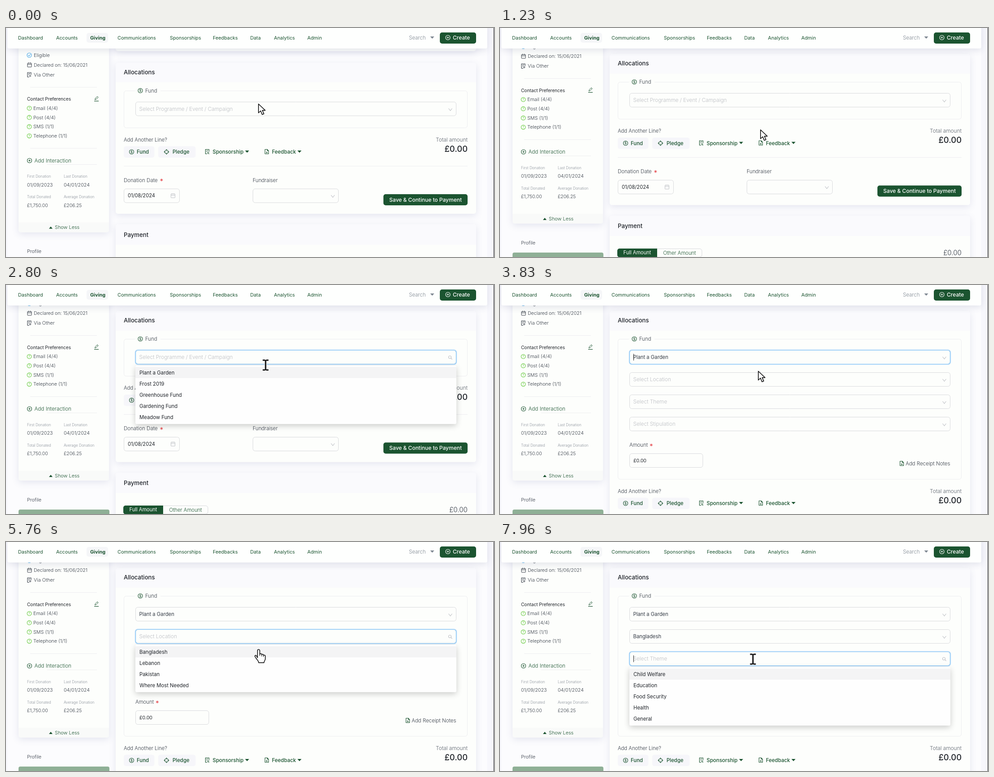
Recreate the animation shown at these times as an HTML page with a canvas. Size 1090x514 px, loop 8000 ms.

```html
<!DOCTYPE html>
<html lang="en">
<head>
<meta charset="utf-8">
<title>Donation form</title>
<style>
  html, body { margin: 0; width: 100%; height: 100%; overflow: hidden; background: #fcfcfe; }
  canvas { display: block; width: 1090px; height: 514px; }
</style>
</head>
<body>
<canvas id="stage" width="1090" height="514"></canvas>
<script>
const ctx = document.getElementById('stage').getContext('2d');
const LOOP = 8000, SCROLL = 19.5, EXPAND_AT = 3660, EXPAND = 231.5;
const GREEN = '#1b5430', INK = '#343b46', DARK = '#1f2329', MUTED = '#8b919b', RED = '#e5484d';
const BORDER = '#d9dadd', FAINT = '#ededf0', PALE = '#bfc1c6', CARD = '#fdfefc', HEAD = '#fafafd', BLUE = '#7fc1f3';

const fields = [
  { y: 162, hint: 'Select Programme / Event / Campaign', value: 'Plant a Garden',
    open: 2380, pick: 3650, close: 3650, blur: 4740,
    items: ['Plant a Garden', 'Frost 2019', 'Greenhouse Fund', 'Gardening Fund', 'Meadow Fund'],
    caret: [[2380, 2740], [3250, 4140]] },
  { y: 212, hint: 'Select Location', value: 'Bangladesh',
    open: 4740, pick: 6910, close: 6970, blur: 7720,
    items: ['Bangladesh', 'Lebanon', 'Pakistan', 'Where Most Needed'],
    caret: [[4740, 5300], [5800, 6300], [6860, 7360]] },
  { y: 262, hint: 'Select Theme', value: '',
    open: 7720, pick: Infinity, close: Infinity, blur: Infinity,
    items: ['Child Welfare', 'Education', 'Food Security', 'Health', 'General'],
    caret: [[7720, 8000]] },
  { y: 312, hint: 'Select Stipulation', value: '', open: Infinity, pick: Infinity, close: Infinity, blur: Infinity, items: [], caret: [] }
];

// start, end, x, y reached at the end
const moves = [
  [60, 630, 582, 228], [1500, 2230, 580, 179], [2730, 3260, 577, 193],
  [4100, 4500, 571, 214], [5260, 5830, 564, 242], [7130, 7530, 565, 263]
];

const clamp = v => Math.max(0, Math.min(1, v));
const span = (t, from, length) => t < from ? 0 : clamp((t - from) / length);
const smooth = u => u * u * (3 - 2 * u);

function text(str, x, y, size, color = INK, weight = 300, align = 'left') {
  ctx.font = `${weight} ${size}px Inter, sans-serif`;
  ctx.textAlign = align;
  ctx.fillStyle = color;
  ctx.fillText(str, x, y + size * 0.36);
}

function box(x, y, w, h, r, fill, stroke, width = 1) {
  ctx.beginPath();
  ctx.roundRect(x, y, w, h, r);
  if (fill) { ctx.fillStyle = fill; ctx.fill(); }
  if (stroke) { ctx.strokeStyle = stroke; ctx.lineWidth = width; ctx.stroke(); }
}

function shadowed(color, blur, dy, draw) {
  ctx.save();
  ctx.shadowColor = color;
  ctx.shadowBlur = blur;
  ctx.shadowOffsetY = dy;
  draw();
  ctx.restore();
}

function line(points, color, width = 1) {
  ctx.beginPath();
  for (let i = 0; i < points.length; i += 2) ctx.lineTo(points[i], points[i + 1]);
  ctx.strokeStyle = color;
  ctx.lineWidth = width;
  ctx.stroke();
}

function ring(x, y, r, color, width = 1) {
  ctx.beginPath();
  ctx.arc(x, y, r, 0, Math.PI * 2);
  ctx.strokeStyle = color;
  ctx.lineWidth = width;
  ctx.stroke();
}

function triangle(x, y, dir, color, w = 4.5) {
  ctx.beginPath();
  ctx.moveTo(x - w, y - 2.5 * dir);
  ctx.lineTo(x + w, y - 2.5 * dir);
  ctx.lineTo(x, y + 2.5 * dir);
  ctx.fillStyle = color;
  ctx.fill();
}

function badge(sign, x, y, color, r = 5) {
  ring(x, y, r, color, 1.1);
  text(sign, x, y, r * 1.55, color, 500, 'center');
}

function plusBadge(x, y, color) {
  ring(x, y, 5, color, 1.1);
  line([x - 2.5, y, x + 2.5, y], color);
  line([x, y - 2.5, x, y + 2.5], color);
}

function calendar(x, y, color) {
  box(x - 4.5, y - 4, 9, 8.5, 0.5, null, color);
  line([x - 4.5, y - 1, x + 4.5, y - 1], color);
  line([x - 2, y - 5.5, x - 2, y - 3], color);
  line([x + 2, y - 5.5, x + 2, y - 3], color);
}

function sheet(x, y, color, mark) {
  line([x + 4, y, x + 4, y - 5, x - 4, y - 5, x - 4, y + 5, x, y + 5], color, 1.1);
  line([x - 2, y - 2.5, x + 2, y - 2.5], color);
  line([x - 2, y, x, y], color);
  ring(x + 2, y + 2.5, 1.5, color);
  if (mark) line([x + 2, y + 4, x + 4.5, y + 5.5], color);
}

function note(x, y, color) {
  line([x + 1, y - 5, x - 4, y - 5, x - 4, y + 5, x + 4, y + 5, x + 4, y - 2, x + 1, y - 5, x + 1, y - 2, x + 4, y - 2], color, 1.1);
  line([x - 2, y + 2, x + 2, y + 2], color);
  line([x, y, x, y + 4], color);
}

function chevron(x, y) {
  line([x - 4, y - 2, x, y + 3, x + 4, y - 2], PALE, 1.1);
}

function magnifier(x, y) {
  ring(x - 1, y - 1, 3, PALE, 1.1);
  line([x + 1.2, y + 1.2, x + 4, y + 4], PALE, 1.2);
}

function card(x, y, w, h, headHeight) {
  shadowed('rgba(70,75,140,.13)', 16, 4, () => box(x, y, w, h, 5, CARD));
  if (headHeight) box(x, y, w, headHeight, [5, 5, 0, 0], HEAD);
}

function sidebar() {
  card(28, -60, 202, 499);
  box(28, 417, 202, 22, [0, 0, 5, 5], '#f9faf9');
  ring(52, 41.5, 5, '#45a5e6', 1.1);
  line([49.5, 41.5, 51.5, 43.5, 54.8, 39.5], '#45a5e6', 1.1);
  text('Eligible', 62, 41.5, 10.8);
  calendar(52.5, 63.5, INK);
  text('Declared on: 15/06/2021', 62, 63.5, 10.6);
  sheet(52, 85.5, INK);
  text('Via Other', 62, 85.5, 10.8);
  line([54, 113.5, 203, 113.5], FAINT);

  text('Contact Preferences', 47, 140, 10.1, DARK, 400);
  line([198.5, 141.5, 199.5, 138.5, 204, 134, 206, 136, 201.5, 140.5, 198.5, 141.5], GREEN);
  line([197, 144.5, 207, 144.5], GREEN, 1.2);
  ['Email (4/4)', 'Post (4/4)', 'SMS (1/1)', 'Telephone (1/1)'].forEach((label, i) => {
    const y = 160.5 + i * 20.7;
    badge('?', 52, y, '#6ccb45', 4.8);
    text(label, 61, y, 10.8);
  });
  line([54, 250.5, 203, 250.5], FAINT);

  plusBadge(52.5, 278, GREEN);
  text('Add Interaction', 63.5, 278, 11.7, GREEN);
  line([92, 287, 203, 287], FAINT);
  const stats = [['First Donation', '01/09/2023'], ['Last Donation', '04/01/2024'],
                 ['Total Donated', '£1,750.00'], ['Average Donation', '£206.25']];
  stats.forEach(([label, value], i) => {
    const x = i % 2 ? 129 : 47, y = i < 2 ? 314 : 360;
    text(label, x, y, 8.3, MUTED);
    text(value, x, y + 18.3, i < 2 ? 10.7 : 10.4);
  });
  triangle(100, 428.5, -1, GREEN, 4);
  text('Show Less', 109, 428, 10.9, GREEN);
  text('Profile', 47, 482, 10.9);
  box(28, 504, 203, 60, 4, '#8fb096');
}

function addLineRow() {
  text('Add Another Line?', 263, 231, 11.3);
  text('Total amount', 1031, 231, 11.8, '#5a616c', 300, 'right');
  text('£0.00', 1031, 251.8, 18.4, DARK, 500, 'right');
  box(263, 246, 68.5, 25.5, 5, '#f6f6fa');
  box(340, 246, 83.5, 25.5, 5, '#f6f6fa');
  badge('$', 280.5, 258.5, GREEN);
  text('Fund', 292, 258.5, 11.4, GREEN, 500);
  ring(358.5, 258.5, 4, GREEN, 1.2);
  for (const [dx, dy] of [[1, 0], [-1, 0], [0, 1], [0, -1]])
    line([358.5 + dx * 2.5, 258.5 + dy * 2.5, 358.5 + dx * 6, 258.5 + dy * 6], GREEN, 1.2);
  text('Pledge', 372, 258.5, 11.4, GREEN, 500);
  sheet(449.5, 258, GREEN, true);
  text('Sponsorship', 461.5, 258.5, 11.5, GREEN, 500);
  triangle(538.5, 258, 1, GREEN);
  note(582.5, 258, GREEN);
  text('Feedback', 594, 258.5, 11.5, GREEN, 500);
  triangle(655.5, 258, 1, GREEN);
  line([263, 290.5, 1031, 290.5], FAINT);
}

function donationRow() {
  text('Donation Date', 263, 322, 11.5);
  text('*', 343.5, 324.5, 15, RED, 500);
  text('Fundraiser', 551, 322, 11.3);
  box(263.5, 341.5, 124, 31, 5, CARD, BORDER);
  text('01/08/2024', 272, 357, 11.1, DARK, 400);
  calendar(373, 357, PALE);
  box(551.5, 341.5, 191, 31, 5, CARD, BORDER);
  chevron(730, 357.5);
  box(843, 353.5, 188, 25, 5, GREEN);
  text('Save & Continue to Payment', 937, 366, 12, '#fff', 500, 'center');
}

function payment() {
  card(245, 421, 805, 200, 46);
  text('Payment', 263, 444.5, 13.2, DARK, 500);
  box(262.5, 495.5, 188.5, 18.5, 5, CARD, BORDER);
  box(262, 495, 89, 19.5, [5, 0, 0, 5], GREEN);
  text('Full Amount', 306.5, 504.5, 11.1, '#fff', 400, 'center');
  text('Other Amount', 401, 504.5, 11.3, GREEN, 300, 'center');
  text('£0.00', 1031, 504.5, 15.2, INK, 300, 'right');
}

function select(f, t, hovered) {
  const focus = span(t, f.open, 120) - span(t, f.blur, 180);
  const top = f.y - 15.5;
  if (focus > 0) box(288.5, top - 1, 718, 33, 6, null, `rgba(30,145,255,${0.2 * focus})`, 2);
  box(289.5, top, 716, 31, 5, CARD, BORDER);
  if (hovered || focus > 0) {
    ctx.save();
    ctx.globalAlpha = hovered ? 1 : focus;
    box(289.5, top, 716, 31, 5, null, BLUE, 1.2);
    ctx.restore();
  }
  const picked = t >= f.pick;
  text(picked ? f.value : f.hint, 297.5, f.y, picked ? 11.3 : 11.8, picked ? INK : '#bcbec3', picked ? 400 : 300);
  if (f.caret.some(([from, to]) => t >= from && t < to)) line([298.5, f.y - 7.5, 298.5, f.y + 7.5], '#222', 1);
  if (t >= f.open && !picked) magnifier(992.5, f.y + 1);
  else chevron(992.5, f.y + 1);
}

function menuAmount(f, t) {
  return t < f.close ? 1 - (1 - span(t, f.open, 220)) ** 5 : 1 - span(t, f.close, 180) ** 1.5;
}

function menu(f, t) {
  const p = menuAmount(f, t);
  if (p <= 0) return;
  const picked = t >= f.pick, h = f.items.length * 25 + 6;
  ctx.save();
  ctx.globalAlpha = p;
  ctx.translate(0, f.y + 19);
  ctx.scale(1, 0.8 + 0.2 * p);

  // The shadow stays outside the panel, so a fading panel is not darkened by it.
  ctx.save();
  ctx.beginPath();
  ctx.rect(0, -100, 1090, h + 200);
  ctx.roundRect(289, 0, 717, h, 4);
  ctx.clip('evenodd');
  shadowed('rgba(0,0,0,.2)', 14, 4, () => box(289, 0, 717, h, 4, '#fefefe'));
  ctx.restore();

  box(289, 0, 717, h, 4, '#fefefe');
  box(289, 3, 717, 25, 0, picked ? '#e8f6fc' : '#f4f4f5');
  f.items.forEach((item, i) => {
    text(item, 298, 15.5 + i * 25, 11.3, DARK, picked && i === 0 ? 600 : 400);
  });
  ctx.restore();
}

function allocations(t, pointer) {
  const expanded = t >= EXPAND_AT, extra = expanded ? EXPAND : 0;
  card(245, 58.5, 805, 339 + extra, 44);
  text('Allocations', 263, 79.5, 13.1, DARK, 500);
  box(263.5, 121.5, 767, 83 + extra, 5, null, FAINT);
  box(288, 118, 57, 7, 0, CARD);
  badge('$', 300, 121, GREEN);
  text('Fund', 311, 121, 11.4);

  const shown = expanded ? fields : fields.slice(0, 1);
  shown.forEach(f => select(f, t, pointer.kind === 'text' && pointer.field === f));
  if (expanded) {
    text('Amount', 289, 359, 11.4);
    text('*', 334, 361.5, 15, RED, 500);
    box(289.5, 378.5, 163.5, 31, 5, CARD, BORDER);
    text('£0.00', 298, 394, 10.6, DARK, 400);
    note(897.5, 400.5, GREEN);
    text('Add Receipt Notes', 906, 400.5, 11.5, INK);
  }
  ctx.save();
  ctx.translate(0, extra);
  addLineRow();
  donationRow();
  payment();
  ctx.restore();
  shown.forEach(f => menu(f, t));
}

function navigation() {
  shadowed('rgba(60,65,110,.14)', 16, 4, () => box(3, -10, 1072, 56, 4, '#fefffe'));
  box(180, 11, 48, 22, 5, '#f5f6f8');
  const links = [['Dashboard', 27], ['Accounts', 112], ['Giving', 188], ['Communications', 249], ['Sponsorships', 366],
                 ['Feedbacks', 462], ['Data', 545.5], ['Analytics', 598.5], ['Admin', 673]];
  for (const [label, x] of links) text(label, x, 22, 10.8, GREEN, label === 'Giving' ? 700 : 400);
  text('Search', 900, 22, 11.5, '#7e8791');
  triangle(952, 21.5, 1, '#7e8791', 4.5);
  box(969, 10, 81, 25, 5, GREEN);
  plusBadge(987, 21.5, '#fff');
  text('Create', 998, 22, 12, '#fff', 500);
}

function tooltip() {
  box(573.5, 251.5, 58, 20, 1, '#fff', '#9a9a9a');
  ctx.font = '9px "Open Sans", sans-serif';
  ctx.textAlign = 'center';
  ctx.fillStyle = '#575757';
  ctx.fillText('Bangladesh', 603, 264.5);
}

function pointerAt(t, offset) {
  let x = 564, y = 170;
  for (const [from, to, endX, endY] of moves) {
    const u = smooth(span(t, from, to - from));
    x += (endX - x) * u;
    y += (endY - y) * u;
  }
  const shown = t >= EXPAND_AT ? fields : fields.slice(0, 1);
  const field = shown.find(f => Math.abs(y - f.y - offset) <= 18.5);
  const overMenu = shown.some(f => menuAmount(f, t) > 0.05 && y > f.y + 19 && y < f.y + 25 + f.items.length * 25);
  const kind = t < 60 ? 'arrow' : overMenu ? 'hand' : field ? 'text' : 'arrow';
  return { x, y, kind, field };
}

const shapes = {
  arrow: new Path2D('M0 .5V20.5L4.8 16L8.2 24.2L12 22.6L8.6 14.8H15Z'),
  text: new Path2D('M-6.5-12.5H-2L0-11.5L2-12.5H6.5V-9.5H2L1.6-9V9L2 9.5H6.5V12.5H2L0 11.5L-2 12.5H-6.5V9.5H-2L-1.6 9V-9L-2-9.5H-6.5Z'),
  hand: new Path2D('M-2.5 19V3C-2.5-.5 2.5-.5 2.5 3V11C3.5 9 7 9.5 7 12C8 10.5 11 11 11 13.5C12.5 12.3 15 13 15 15.5V21C15 25 12 26 12 30H0C0 26-3 24-5.5 20.5L-8 16.5C-9.5 14-6.5 12.5-5 14.5Z')
};

function drawPointer({ x, y, kind }) {
  ctx.save();
  ctx.translate(x, y);
  ctx.lineJoin = 'round';
  const beam = kind === 'text';
  ctx.fillStyle = beam ? '#1a1a1a' : '#fff';
  ctx.strokeStyle = beam ? '#fff' : '#1c1c1c';
  ctx.lineWidth = 2;
  if (beam) ctx.stroke(shapes[kind]);
  ctx.fill(shapes[kind]);
  ctx.lineWidth = 1.7;
  if (!beam) ctx.stroke(shapes[kind]);
  if (kind === 'hand') {
    line([2.5, 10, 2.5, 15], '#1c1c1c', 1.3);
    line([7, 12, 7, 16], '#1c1c1c', 1.3);
    line([11, 13.5, 11, 17], '#1c1c1c', 1.3);
  }
  ctx.restore();
}

function draw(t) {
  const offset = SCROLL * (1 - span(t, 830, 400)) ** 1.35;
  const pointer = pointerAt(t, offset);
  ctx.fillStyle = '#fcfcfe';
  ctx.fillRect(0, 0, 1090, 514);
  ctx.fillStyle = '#f7f7fc';
  ctx.fillRect(0, 0, 3, 514);
  ctx.fillRect(1075, 0, 15, 514);
  ctx.save();
  ctx.translate(0, offset);
  sidebar();
  card(245, -100, 805, 132.5);
  allocations(t, pointer);
  ctx.restore();
  navigation();
  ctx.fillStyle = '#3a3a3e';
  ctx.fillRect(1089, 0, 1, 514);
  if (t >= 6100 && t < 6600) tooltip();
  drawPointer(pointer);
}

const start = performance.now();
function tick() {
  draw((performance.now() - start) % LOOP);
  requestAnimationFrame(tick);
}
tick();
</script>
</body>
</html>
```
